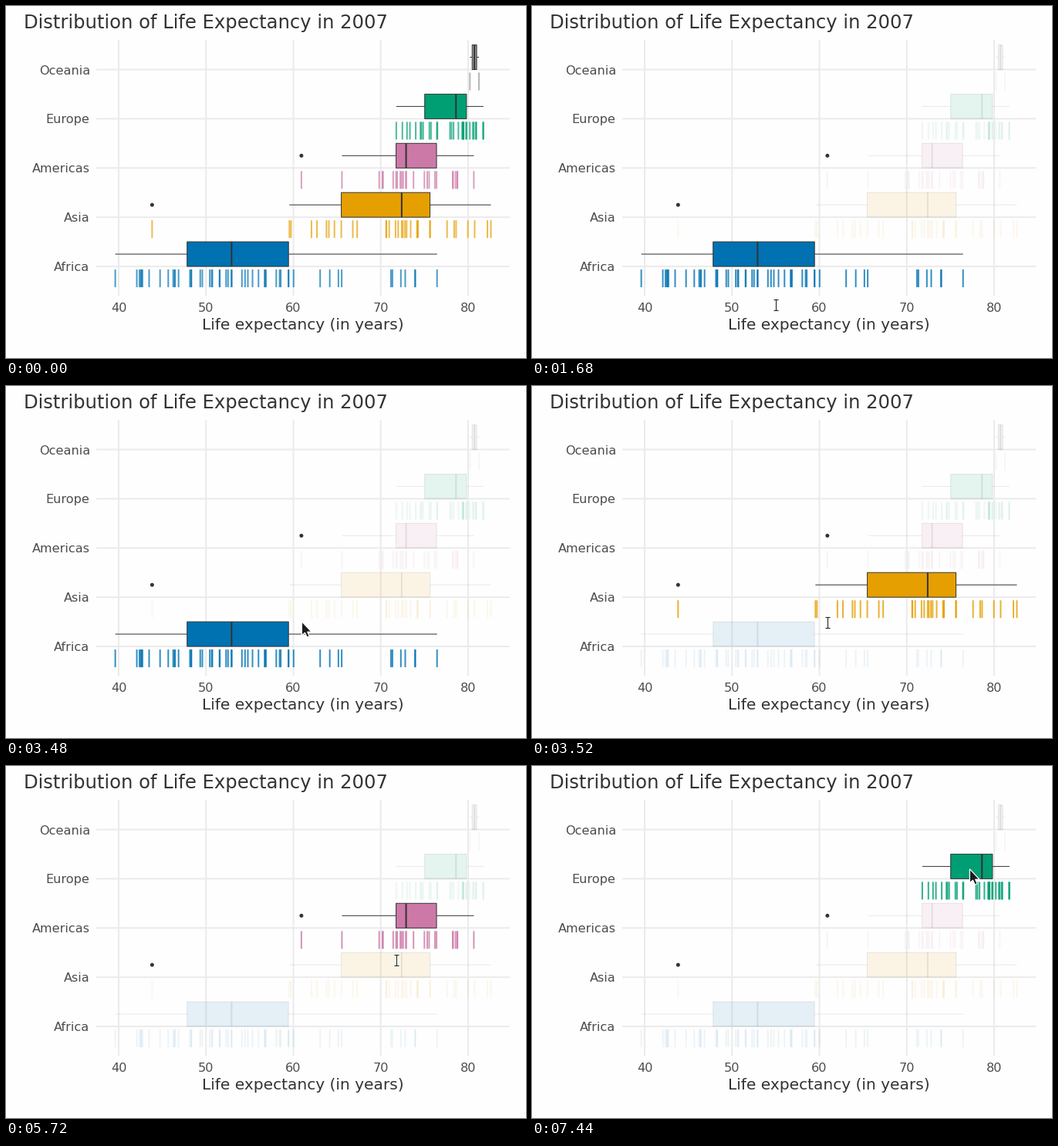
Write a matplotlib script that moves like this. It is 674 by 457 pixels and loops after 8000 ms.

```python
import matplotlib.pyplot as plt
import numpy as np
from matplotlib.animation import FuncAnimation
from matplotlib.collections import LineCollection
from matplotlib.patches import Circle, Polygon, Rectangle

W, H, DPI = 674, 457, 64
PT = 72 / DPI                      # points per pixel
STEP, LOOP = 20, 8000
INK, GREY, GRID = "#333333", "#4d4d4d", "#ebebeb"

# name, colour, left edge of its label, life expectancies in 2007
GROUPS = [
    ("Africa", "#0072B2", 62.2, [
        72.301, 42.731, 56.728, 50.728, 52.295, 49.580, 50.430, 44.741,
        50.651, 65.152, 46.462, 55.322, 48.328, 54.791, 71.338, 51.579,
        58.040, 52.947, 56.735, 59.448, 60.022, 56.007, 46.388, 54.110,
        42.592, 45.678, 73.952, 59.443, 48.303, 54.467, 64.164, 72.801,
        71.164, 42.082, 52.906, 56.867, 46.859, 76.442, 46.242, 65.528,
        63.062, 42.568, 48.159, 49.339, 58.556, 39.613, 52.517, 58.420,
        73.923, 51.542, 42.384, 43.487]),
    ("Asia", "#E69F00", 75.0, [
        43.828, 75.635, 64.062, 59.723, 72.961, 82.208, 64.698, 70.650,
        70.964, 59.545, 80.745, 82.603, 72.535, 67.297, 78.623, 77.588,
        71.993, 74.241, 66.803, 62.069, 63.785, 75.640, 65.483, 71.688,
        72.777, 79.972, 72.396, 74.143, 78.400, 70.616, 74.249, 73.422,
        62.698]),
    ("Americas", "#CC79A7", 33.9, [
        75.320, 65.554, 72.390, 80.653, 78.553, 72.889, 78.782, 78.273,
        72.235, 74.994, 71.878, 70.259, 60.916, 70.198, 72.567, 76.195,
        72.899, 75.537, 71.752, 71.421, 78.746, 69.819, 78.242, 76.384,
        73.747]),
    ("Europe", "#009E73", 51.7, [
        76.423, 79.829, 79.441, 74.852, 73.005, 75.748, 76.486, 78.332,
        79.313, 80.657, 79.406, 79.483, 73.338, 81.757, 78.885, 80.546,
        74.543, 79.762, 80.196, 75.563, 78.098, 72.476, 74.002, 74.663,
        77.926, 80.941, 80.884, 81.701, 71.777, 79.425]),
    ("Oceania", "#999999", 42.8, [81.235, 80.204]),
]

# start in ms, pointer x, y, pointer shape, highlighted group
STEPS = [
    (0, 0, 0, None, None),
    (1140, 318, 453, "arrow", None),
    (1420, 317, 388, "arrow", None),
    (1560, 317, 388, "beam", None),
    (1680, 317, 388, "beam", "Africa"),
    (1700, 315, 346, "arrow", "Africa"),
    (1980, 356, 339, "arrow", "Africa"),
    (2240, 315, 336, "arrow", "Africa"),
    (2260, 356, 346, "arrow", "Africa"),
    (2540, 322, 334, "arrow", "Africa"),
    (3200, 356, 332, "arrow", "Africa"),
    (3480, 384, 307, "arrow", "Africa"),
    (3500, 384, 307, "beam", "Africa"),
    (3520, 384, 307, "beam", "Asia"),
    (3760, 505, 266, "arrow", "Asia"),
    (3780, 460, 278, "arrow", "Asia"),
    (4040, 487, 258, "arrow", "Asia"),
    (4320, 500, 278, "arrow", "Asia"),
    (5160, 484, 259, "arrow", "Asia"),
    (5620, 507, 252, "arrow", "Asia"),
    (5720, 507, 252, "beam", "Americas"),
    (5900, 546, 205, "arrow", "Americas"),
    (6000, 546, 215, "arrow", "Americas"),
    (6280, 530, 201, "arrow", "Americas"),
    (6860, 539, 188, "arrow", "Americas"),
    (6980, 566, 172, "arrow", "Americas"),
    (7000, 566, 172, "beam", "Americas"),
    (7040, 566, 172, "beam", "Europe"),
    (7260, 582, 153, "arrow", "Europe"),
    (7440, 568, 135, "arrow", "Europe"),
]

ARROW = np.array([(-0.6, -1.2), (-0.6, 16.8), (3.4, 13.2), (6.2, 19.2),
                  (9.2, 17.8), (6.6, 12.2), (12, 12.2)])
BEAM = np.array([[(-3, -7), (3, -7)], [(0, -7), (0, 7)], [(-3, 7), (3, 7)]])

fig = plt.figure(figsize=(W / DPI, H / DPI), dpi=DPI, facecolor="#fefefe")
ax = fig.add_axes([0, 0, 1, 1])
ax.set_xlim(0, W)
ax.set_ylim(H, 0)
ax.axis("off")


def px(years):
    return 146 + (np.asarray(years) - 40) * 11.325


def lines(segs, color, width, z):
    return ax.add_collection(LineCollection(
        segs, colors=color, linewidths=width * PT, zorder=z, snap=False),
        autolim=False)


def label(x, y, text, size, color=INK):
    ax.text(x, y, text, fontsize=size * PT, color=color,
            family="DejaVu Sans", ha="left", va="baseline")


def draw_group(row, name, color, left, years):
    """Draw one box plot with its rug; return its parts with base opacity."""
    base = 338.1 - 63.9 * row
    mid = base - 16
    lines([[(117, base), (653, base)]], GRID, 2, 1)
    label(left, base + 6.05, name, 16.13, GREY)

    years = np.array(years)
    q1, med, q3 = np.percentile(years, [25, 50, 75])
    reach = 1.5 * (q3 - q1)
    inside = (years >= q1 - reach) & (years <= q3 + reach)
    lo, hi = px([years[inside].min(), years[inside].max()])
    x1, xm, x3 = px([q1, med, q3])

    for x in px(years[~inside]):
        ax.add_patch(Circle((x, mid), 2.5, fc=INK, lw=0, zorder=4))
    whisker = lines([[(lo, mid), (x1, mid)], [(x3, mid), (hi, mid)]],
                    INK, 1, 3)
    box = ax.add_patch(Rectangle((x1, mid - 16), x3 - x1, 32, fc=color,
                                 ec=INK, lw=PT, zorder=3, snap=False))
    median = lines([[(xm, mid - 16), (xm, base)]], INK, 2, 4)
    rug = lines([[(x, base + 4), (x, base + 27)] for x in px(years)],
                color, 2, 3)
    return [whisker, box, median], rug


lines([[(x, 44), (x, 376)] for x in px([40, 50, 60, 70, 80])], GRID, 2, 1)
for tick in range(40, 90, 10):
    label(px(tick) - 10.26, 397, str(tick), 16.13, GREY)
label(22.6, 29, "Distribution of Life Expectancy in 2007", 24.2)
label(254, 420, "Life expectancy (in years)", 20.17)

plots = {g[0]: draw_group(i, *g) for i, g in enumerate(GROUPS)}

arrow = ax.add_patch(Polygon(ARROW, fc="#1c1c1c", ec="white", lw=1.2 * PT,
                             joinstyle="miter", zorder=9))
halo = lines(BEAM, "white", 3, 9)
beam = lines(BEAM, "#222222", 1.1, 10)


def update(frame):
    now = frame * STEP
    _, x, y, shape, active = [s for s in STEPS if s[0] <= now][-1]
    for name, (parts, rug) in plots.items():
        dim = active is not None and name != active
        for part in parts:
            part.set_alpha(0.1 if dim else 1)
        rug.set_alpha(0.07 if dim else 0.8 if active else 0.7)
    arrow.set_visible(shape == "arrow")
    arrow.set_xy(ARROW + (x, y))
    for part in (halo, beam):
        part.set_visible(shape == "beam")
        part.set_segments(BEAM + (x - 0.5, y + 0.5))
    return []


anim = FuncAnimation(fig, update, frames=LOOP // STEP, interval=STEP,
                     init_func=lambda: update(0), repeat=True, repeat_delay=0)
plt.show()
```
